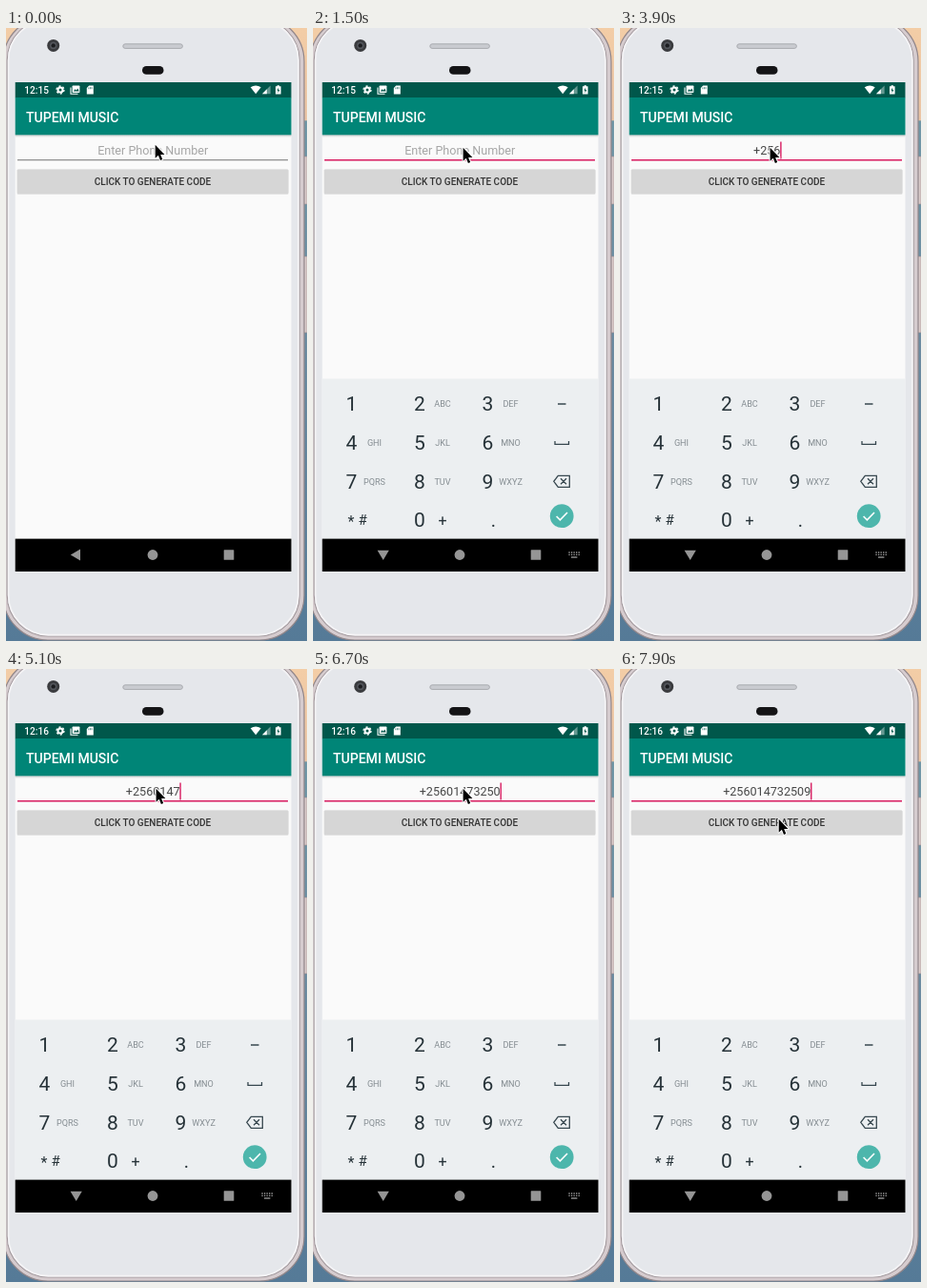
An HTML page that plays this animation: 316x644 px, repeating every 8000 ms.

```html
<!DOCTYPE html>
<html lang="en">
<head>
<meta charset="utf-8">
<title>Phone number entry</title>
<style>
  html, body { margin: 0; width: 100%; height: 100%; overflow: hidden; background: #5d8199; }
  svg { display: block; width: 316px; height: 644px; font-family: Roboto, "Noto Sans", sans-serif; }
  .mid { text-anchor: middle; }
  .medium { font-weight: 500; }
</style>
</head>
<body>
<svg viewBox="0 0 316 644" xmlns="http://www.w3.org/2000/svg">
  <defs>
    <linearGradient id="wall" x1="0" y1="0" x2="0" y2="1">
      <stop offset="0" stop-color="#f3cda6"/>
      <stop offset=".15" stop-color="#e9c3a4"/>
      <stop offset=".152" stop-color="#6f96a6"/>
      <stop offset=".5" stop-color="#6c8ba0"/>
      <stop offset="1" stop-color="#557a97"/>
    </linearGradient>
    <linearGradient id="shade" x1="0" y1="0" x2="0" y2="1">
      <stop offset="0" stop-color="#c4c6c6"/>
      <stop offset="1" stop-color="#fafafa"/>
    </linearGradient>
    <clipPath id="screen"><rect x="9.7" y="57" width="289.8" height="480"/></clipPath>
  </defs>

  <rect width="316" height="644" fill="url(#wall)"/>

  <!-- Phone body -->
  <g fill="#d9c9c8" stroke="#a08f92" stroke-width=".6">
    <rect x="312" y="135" width="4" height="50"/>
    <rect x="312" y="240" width="4" height="80"/>
  </g>
  <rect x="-3" y="-12" width="316" height="655" rx="47" fill="#d6cccf" stroke="#92878b" stroke-width="1.2"/>
  <rect x="1.2" y="-9" width="307" height="648" rx="43" fill="#e5e7eb" stroke="#a3999d" stroke-width="1.1"/>
  <rect x="2.6" y="-8" width="304.2" height="645.6" rx="42" fill="#e5e7eb" stroke="#f5f4f6" stroke-width="1.6"/>
  <circle cx="49.7" cy="18.4" r="6.5" fill="#3a3b3e"/>
  <circle cx="49.7" cy="18.4" r="3.6" fill="#55585e"/>
  <circle cx="49.7" cy="18.4" r="2.2" fill="#1c1d20"/>
  <rect x="122.8" y="16.8" width="62.6" height="4.6" rx="2.3" fill="#c9cbd0" stroke="#a9abb0"/>
  <rect x="143" y="40" width="22.5" height="8.8" rx="4.4" fill="#141416"/>

  <!-- App -->
  <rect x="9.7" y="57" width="289.8" height="514" fill="#fafafa"/>
  <rect x="9.7" y="112" width="289.8" height="3" fill="url(#shade)"/>
  <rect x="9.7" y="57" width="289.8" height="16.2" fill="#00574b"/>
  <rect x="9.7" y="73" width="289.8" height="39.3" fill="#008577"/>
  <text x="21" y="98.5" font-size="14.06" class="medium" fill="#fff">TUPEMI MUSIC</text>

  <!-- Status bar -->
  <g fill="#fff">
    <text id="clock" x="19.3" y="68.8" font-size="10.1" class="medium"></text>
    <circle cx="57" cy="65" r="2.5" fill="none" stroke="#fff" stroke-width="2"/>
    <circle cx="57" cy="65" r="4" fill="none" stroke="#fff" stroke-width="1.3" stroke-dasharray="2.1 2.09"/>
    <path d="M68 62.5V69.3H75.5" fill="none" stroke="#fff" stroke-width="1.1"/>
    <rect x="69.6" y="60.5" width="7.8" height="7.4" rx=".7"/>
    <path d="M70.8 66.6l1.7-2.4 1.3 1.4 1.5-2 1.4 3z" fill="#00574b"/>
    <path d="M87.2 60.5H91.8V69.5H84.8V63z"/>
    <path d="M86.8 62.4v1.8M88.4 62v2.2M90 62v2.2" stroke="#00574b" stroke-width=".6"/>
    <path d="M256.7 62.3Q262.2 58.8 267.7 62.3L262.2 69.2z"/>
    <path d="M277.6 60.4V69.2H269z" opacity=".4"/>
    <path d="M273.8 64.3V69.2H269z"/>
    <path d="M284.6 60.3H286.9V61.3H288.6V69.5H283V61.3H284.6z"/>
    <path d="M286.2 62.4l-1.7 3.4h1.1v2.5l1.7-3.4h-1.1z" fill="#00574b"/>
  </g>

  <!-- Form -->
  <text id="hint" x="154.2" y="133.2" font-size="12.6" class="mid" fill="#a6a6a6">Enter Phone Number</text>
  <text id="entry" x="154.2" y="133.2" font-size="12.6" class="mid" fill="#484848"></text>
  <rect id="rule" x="12" width="284"/>
  <rect id="caret" y="119.5" width="1.4" height="18" fill="#d81b60"/>
  <rect x="11.7" y="148.8" width="284.8" height="26" rx="1" fill="#c4c5c5" opacity=".6"/>
  <rect x="11.8" y="148.5" width="284.5" height="25.6" rx="1" fill="#d6d6d6"/>
  <text x="154" y="165.3" font-size="10" class="mid medium" fill="#333">CLICK TO GENERATE CODE</text>

  <!-- Keyboard -->
  <g clip-path="url(#screen)">
    <g id="board">
      <rect x="9" y="368.5" width="291" height="240" fill="#eceff1"/>
      <g id="keys"></g>
      <g fill="none" stroke="#37474f" stroke-width="1.3">
        <path d="M257 395H265.5"/>
        <path d="M254 434V437.3H268.5V434"/>
        <path d="M257.3 470.3H269.3V482.3H257.3L252.8 476.3zM260 473.3l6 6M266 473.3l-6 6"/>
      </g>
      <circle cx="261.2" cy="512.7" r="12.4" fill="#4db6ac"/>
      <path d="M255.6 513l3.8 3.8 7.6-7.8" fill="none" stroke="#fff" stroke-width="1.6"/>
    </g>
  </g>

  <!-- Navigation bar -->
  <rect x="9.7" y="536.6" width="289.8" height="34.4" fill="#000"/>
  <g fill="#959595">
    <path id="back" d="M67.8 553.5L78 547.4V559.6z"/>
    <circle cx="154" cy="553.5" r="5.4"/>
    <rect x="228.7" y="548.2" width="10.6" height="10.6" rx=".6"/>
    <g id="switch" fill="none" stroke="#a0a0a0" stroke-width="1.3">
      <path d="M268.4 551H280M268.4 553.4H280" stroke-dasharray="1.3 1.25"/>
      <path d="M271 556H277.4"/>
    </g>
  </g>

  <path id="mouse" d="M0 0V14L3.2 11.1 5.3 16.2 7.6 15.2 5.5 10.2H9.8z" fill="#000" stroke="#fff" stroke-width="2" stroke-linejoin="round" paint-order="stroke"/>
</svg>
<script>
const LOOP = 8000;
const FOCUS = 900;
const NUMBER = "+256014732509";
// Moment at which each character is typed
const TYPED = [2500, 2800, 3200, 3500, 4000, 4300, 4600, 4900, 5400, 5800, 6100, 6400, 6900];
const MOUSE = [[0, 156.7, 122.7], [500, 156.7, 122.7], [700, 157.6, 125.7], [7550, 157.6, 125.7], [7850, 166.7, 157.7], [LOOP, 166.7, 157.7]];

const el = id => document.getElementById(id);
const set = (id, attrs) => {
  for (const key in attrs) el(id).setAttribute(key, attrs[key]);
};
const show = (id, on) => set(id, { visibility: on ? "visible" : "hidden" });
const clamp = v => Math.min(1, Math.max(0, v));

function label(x, y, size, fill, text) {
  const node = document.createElementNS("http://www.w3.org/2000/svg", "text");
  const attrs = { x, y, "font-size": size, fill, class: "mid" };
  for (const key in attrs) node.setAttribute(key, attrs[key]);
  node.textContent = text;
  el("keys").append(node);
}

function buildKeys() {
  const letters = ["", "ABC", "DEF", "GHI", "JKL", "MNO", "PQRS", "TUV", "WXYZ"];
  letters.forEach((group, i) => {
    const x = 40.5 + (i % 3) * 71.5;
    const y = 402.3 + Math.floor(i / 3) * 40.7;
    label(x, y, 21, "#263238", i + 1);
    label(x + 24, y - 4.2, 9.1, "#858d92", group);
  });
  label(112, 524.4, 21, "#263238", "0");
  label(40, 523.5, 16, "#263238", "*");
  label(52, 522.3, 15, "#263238", "#");
  label(136, 522.5, 16, "#263238", "+");
  label(189.5, 524, 20, "#263238", ".");
}

function mouseAt(t) {
  const i = MOUSE.findIndex(p => p[0] > t);
  const [t0, x0, y0] = MOUSE[i - 1];
  const [t1, x1, y1] = MOUSE[i];
  const k = (t - t0) / (t1 - t0);
  return [x0 + (x1 - x0) * k, y0 + (y1 - y0) * k];
}

function draw(t) {
  const focused = t >= FOCUS;
  const count = TYPED.filter(at => at <= t).length;
  const lastInput = count ? TYPED[count - 1] : FOCUS;

  el("clock").textContent = t < 4700 ? "12:15" : "12:16";
  el("entry").textContent = NUMBER.slice(0, count);
  show("hint", count === 0);

  const half = count ? el("entry").getComputedTextLength() / 2 : 0;
  set("caret", { x: 154 + half });
  show("caret", focused && Math.floor((t - lastInput) / 500) % 2 === 0);
  set("rule", focused
    ? { y: 138, height: 1.5, fill: "#d81b60" }
    : { y: 138.3, height: 0.9, fill: "#666" });

  const rise = clamp((t - 980) / 220);
  const eased = 1 - (1 - rise) ** 2;
  set("board", { transform: `translate(0 ${40 * (1 - eased)})`, opacity: eased });

  set("back", { transform: `rotate(${focused ? -90 : 0} 73.5 553.3)` });
  show("switch", focused);
  set("mouse", { transform: `translate(${mouseAt(t)})` });
}

buildKeys();
const start = performance.now();
function tick() {
  draw((performance.now() - start) % LOOP);
  requestAnimationFrame(tick);
}
tick();
</script>
</body>
</html>
```
